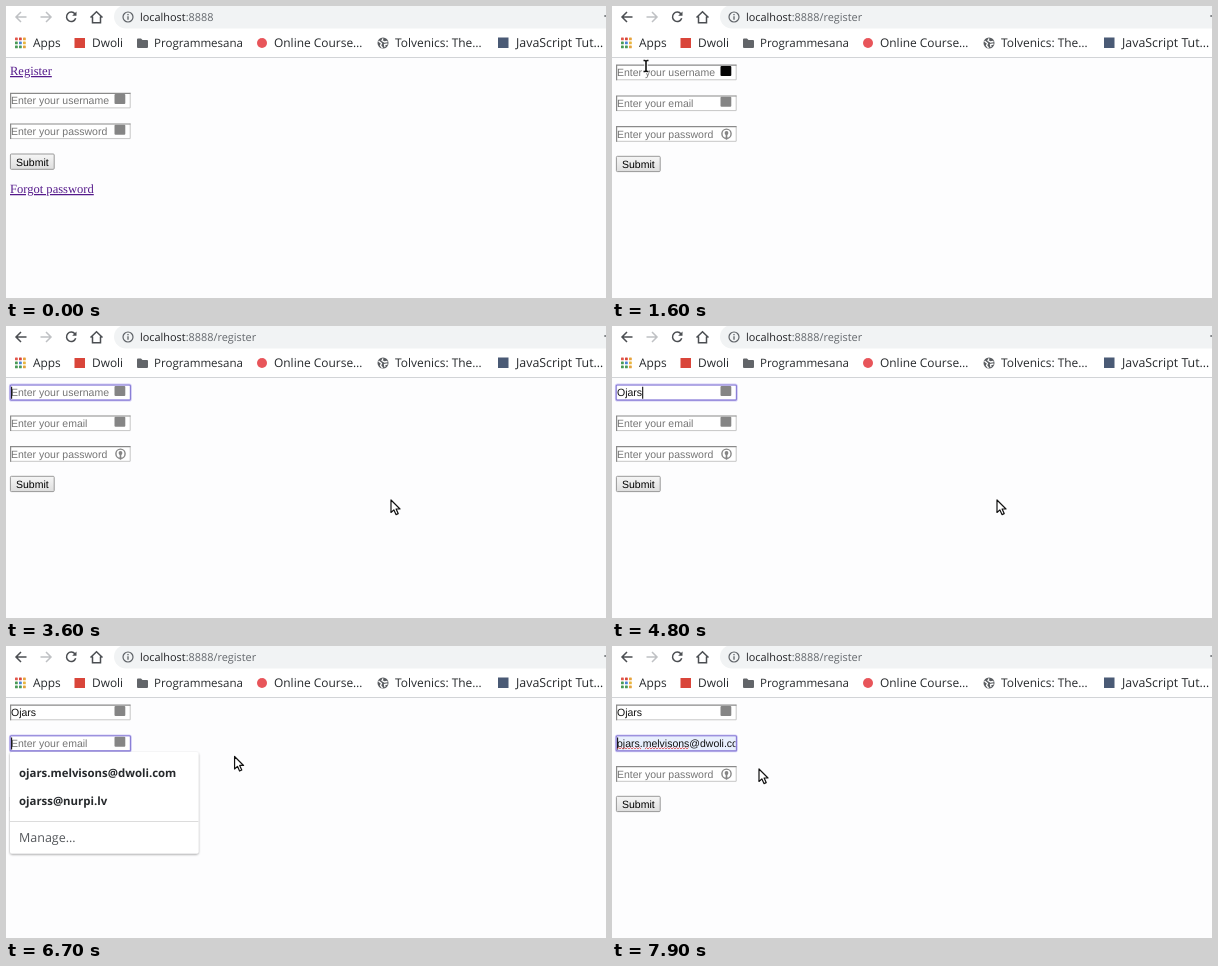
Recreate the animation shown at these times as an HTML page. Size 600x292 px, loop 8 s.

```html
<!DOCTYPE html>
<html lang="en">
<head>
<meta charset="utf-8">
<title>Registration form</title>
<style>
  html, body { margin: 0; width: 100%; height: 100%; overflow: hidden; background: #fdfdfe; }
  svg { display: block; }
  text { white-space: pre; text-rendering: geometricPrecision; }
  .ui { font-family: "Open Sans", "Noto Sans", sans-serif; fill: #26292c; }
  .field { font: 10.5px "Liberation Sans", Arial, sans-serif; }
  .link { font: 12.55px "Liberation Serif", "Times New Roman", serif; fill: #551a8b; text-decoration: underline; }
</style>
</head>
<body>
<svg id="stage" width="600" height="292" viewBox="0 0 600 292">
  <defs>
    <linearGradient id="face" x1="0" y1="0" x2="0" y2="1">
      <stop offset="0" stop-color="#f6f6f6"/><stop offset="1" stop-color="#dedede"/>
    </linearGradient>
    <filter id="shadow" x="-10%" y="-10%" width="120%" height="125%">
      <feDropShadow dx="0" dy="1" stdDeviation="1.3" flood-opacity=".4"/>
    </filter>
    <clipPath id="inner"><rect x="4" y="50" width="119.5" height="100"/></clipPath>
  </defs>
  <rect width="600" height="292" fill="#fdfdfe"/>
  <rect width="600" height="51" fill="#fff"/>
  <rect x="108" y="-1" width="520" height="23.5" rx="11.7" fill="#f1f3f4"/>
  <path d="M0 51.5H600" stroke="#d2d4d7"/>

  <g fill="none" stroke="#4b4e52" stroke-width="1.5">
    <path id="back" d="M20.5 11H10.5M15 6L10 11L15 16"/>
    <path d="M34.5 11H44.5M40 6L45 11L40 16" stroke="#bfc1c4"/>
    <path d="M69 8A4.7 4.7 0 1 0 69.7 12.3"/>
    <path d="M70.5 5.5V9.8H66.2Z" fill="#4b4e52" stroke="none"/>
    <path d="M84.5 11.5L90.5 5.8L96.5 11.5M86.5 10.5V16.7H94.5V10.5"/>
    <circle cx="122" cy="11" r="5" stroke="#5f6368" stroke-width="1.2"/>
    <path d="M122 10.3V13.8M122 8V9.3" stroke="#5f6368" stroke-width="1.3"/>
    <path d="M598.3 10H600" stroke="#5f6368"/>
  </g>
  <text class="ui" x="134" y="15" font-size="10.9"><tspan fill="#202124">localhost</tspan><tspan fill="#63676c">:8888</tspan><tspan id="route" fill="#63676c">/register</tspan></text>

  <g id="marks"></g>
  <rect x="68.5" y="32" width="10.5" height="10" fill="#d9453a"/>
  <path d="M131 33.5Q131 32.5 132 32.5H135L136.5 34H141Q142 34 142 35V41Q142 42 141 42H132Q131 42 131 41Z" fill="#626569"/>
  <circle cx="256" cy="37" r="5" fill="#e8555a"/>
  <circle cx="377" cy="37" r="5.5" fill="#5a5d61"/>
  <path d="M372.5 35L375.5 37.5L374.5 39.5L376.5 42M377 32.5L376 34.5L378.5 36L381.5 35.5M379 41L378.5 38.5L381.5 38" fill="none" stroke="#fff" stroke-width="1.3"/>
  <rect x="492" y="31.5" width="10.5" height="10.5" fill="#4a5a75"/>

  <g id="page"></g>
  <g id="menu">
    <rect x="4" y="106" width="188.5" height="101.5" rx="2" fill="#fff" filter="url(#shadow)"/>
    <rect id="option" x="4" y="112.5" width="188.5" height="28" fill="#c5c5c5"/>
    <g class="ui" font-size="11.4" font-weight="700">
      <text x="13" y="131">ojars.melvisons@dwoli.com</text>
      <text x="13" y="159">ojarss@nurpi.lv</text>
    </g>
    <path d="M4 175.5H192.5" stroke="#dcdcdc"/>
    <text class="ui" x="13" y="196" font-size="12.5" style="fill:#55585c">Manage…</text>
  </g>
  <g id="pointer" stroke-linejoin="round"></g>
</svg>
<script>
const $ = id => document.getElementById(id);
const LOOP = 8000, STEP = 100;
const NAME = "Ojars", EMAIL = "ojars.melvisons@dwoli.com";
const DOTS = ["#e2574c", "#d9453a", "#e8a33d", "#4a9a57", "#4a83d4", "#e8b53d", "#4a9a57", "#4a9a57", "#e2a33d"];

$("marks").innerHTML = DOTS.map((c, i) =>
  `<rect x="${9 + i % 3 * 4}" y="${31.5 + Math.floor(i / 3) * 4}" width="2.8" height="2.8" rx=".6" fill="${c}"/>`).join("") +
  [["Apps", 27, 11.9], ["Dwoli", 86, 11.9], ["Programmesana", 148, 11.55], ["Online Course…", 268, 11.95],
   ["Tolvenics: The…", 389, 11.95], ["JavaScript Tut…", 510, 12.4]].map(([s, x, size]) =>
  `<text class="ui" x="${x}" y="41" font-size="${size}">${s}</text>`).join("");

// time, x, y of the pointer's hot spot
const PATH = [
  [100, 517, 175], [900, 34, 60], [1600, 34, 60], [2100, 58, 69], [2300, 58, 69],
  [3100, 385, 174], [5400, 385, 174], [6300, 84.5, 97.5], [6500, 84.5, 97.5],
  [6800, 279, 115], [7100, 151, 123], [7500, 151, 123], [7900, 147, 123]
];

const BEAM = "M-2.5-5.5H-1L0-4.5L1-5.5H2.5M0-4.5V4.5M-2.5 5.5H-1L0 4.5L1 5.5H2.5";
const SHAPES = {
  arrow: `<path d="M0 0V12.5L2.9 9.9L5 14.6L7.2 13.6L5.1 9H9Z" fill="#fff" stroke="#111" stroke-width="1.2"/>`,
  hand: `<path d="M-1 1Q-1-1 .5-1Q2-1 2 1V4Q3.5 3 4.5 4.5Q6 3.7 6.8 5.2Q8.5 4.7 8.5 6.5V9L7.5 12.5H0L-3.5 7.5Q-3.5 5.7-1 7.5Z" fill="#fff" stroke="#111" stroke-width="1.2"/>
    <path d="M2 4V6.5M4.5 4.5V6.5M6.8 5.2V7" stroke="#111"/>`,
  beam: `<path d="${BEAM}" fill="none" stroke="#fff" stroke-width="3.4"/><path d="${BEAM}" fill="none" stroke="#111" stroke-width="1.6"/>`
};

function position(t) {
  let i = 0;
  while (i < PATH.length - 2 && t >= PATH[i + 1][0]) i++;
  const [t0, x0, y0] = PATH[i], [t1, x1, y1] = PATH[i + 1];
  const p = Math.max(0, Math.min(1, (t - t0) / (t1 - t0))), e = p * p * (3 - 2 * p);
  return [x0 + (x1 - x0) * e, y0 + (y1 - y0) * e];
}

const inside = ([px, py], x, y, w, h) => px >= x && px <= x + w && py >= y && py <= y + h;
const show = (id, on) => $(id).setAttribute("display", on ? "inline" : "none");

function squiggle(x0, x1, y) {
  let d = `M${x0} ${y}`;
  for (let x = x0 + 1.5, k = 1; x <= x1; x += 1.5, k++) d += `L${x} ${y - k % 2 * 1.5}`;
  return `<path d="${d}" fill="none" stroke="#e04848" stroke-width=".8"/>`;
}

function field(y, hint, o = {}) {
  let s = `<rect x="4" y="${y + .5}" width="120.5" height="15.5" fill="${o.filled ? "#e8effd" : "#fff"}"/>`;
  if (o.focus) s += `<rect x="4" y="${y + .5}" width="120.7" height="15.7" rx="1.5" fill="none" stroke="#d3cdf6" stroke-width="2.2"/>
    <rect x="4.2" y="${y + .8}" width="120.3" height="15.1" rx="1" fill="none" stroke="#8a7fd6" stroke-width="1.1"/>`;
  else s += `<path d="M4 ${y + 15.6}H124.2V${y + .5}" fill="none" stroke="#c6c6c6"/>
    <path d="M4.6 ${y + 16}V${y + 1}H124.5" fill="none" stroke="#8a8a8a" stroke-width="1.2"/>`;
  s += `<text class="field" x="5" y="${y + 12}" clip-path="url(#inner)" fill="${o.value ? "#111" : "#757575"}">${o.value || hint}</text>`;
  if (o.caret != null) s += `<path d="M${o.caret} ${y + 2.5}V${y + 14.5}" stroke="#111" stroke-width="1.1"/>`;
  if (o.icon === "key") s += `<circle cx="114.5" cy="${y + 8}" r="4.6" fill="none" stroke="#858585" stroke-width="1.4"/>
    <circle cx="114.5" cy="${y + 7.3}" r="1.9" fill="#858585"/><path d="M114.5 ${y + 8}V${y + 14}" stroke="#858585" stroke-width="1.6"/>`;
  else if (o.icon !== "none") s += `<rect x="108.5" y="${y + 1.8}" width="10.8" height="10" rx="1" fill="${o.hover ? "#050505" : "#858585"}"/>`;
  return s;
}

const button = y => `<rect x="4.4" y="${y}" width="43.8" height="15.3" rx="1" fill="url(#face)" stroke="#999"/>
  <text class="field" x="10" y="${y + 11.5}" fill="#000">Submit</text>`;
const link = (s, y) => `<text class="link" x="4" y="${y}">${s}</text>`;

const login = over => link("Register", 69) +
  field(86.3, "Enter your username", { hover: over(86) }) +
  field(117, "Enter your password", { hover: over(117) }) +
  button(148) + link("Forgot password", 187);

function register(t, over, preview) {
  const typed = t < 4500 ? "" : t < 4800 ? NAME.slice(0, (t - 4400) / 100) : NAME;
  const widths = [0, .778, 1, 1.556, 1.889, 2.389];
  const onName = t >= 2300 && t < 6500, onEmail = t >= 6500;
  const blink = t < 4500 ? (t - 2600 + 1000) % 1000 < 500 : t < 5500 || t >= 6000;
  return field(58.2, "Enter your username", {
    value: typed, focus: onName, hover: over(58),
    caret: onName && blink ? 5.6 + widths[typed.length] * 10.5 : null
  }) + field(89, "Enter your email", {
    value: preview ? EMAIL : "", filled: preview, focus: onEmail, hover: over(89),
    icon: preview ? "none" : "", caret: onEmail ? 5.6 : null
  }) + (t >= 7600 ? squiggle(5, 30, 103) + squiggle(33, 77, 103) : "") +
    field(119.7, "Enter your password", { icon: "key" }) + button(150.3);
}

function draw(ms) {
  const t = Math.floor(ms % LOOP / STEP) * STEP;
  const pos = position(t), second = t >= 1300, menu = t >= 6600 && t < 7600;
  const over = y => inside(pos, 4, y, 120, 17);
  const chosen = menu && inside(pos, 4, 112, 188, 28);
  $("page").innerHTML = second ? register(t, over, chosen || t >= 7600) : login(over);
  $("back").setAttribute("stroke", second ? "#4b4e52" : "#bfc1c4");
  show("route", second);
  show("menu", menu);
  show("option", chosen);
  const rows = second ? [58, 89, 120] : [86, 117];
  const kind = !second && inside(pos, 4, 57, 42, 15) ? "hand" : !menu && rows.some(over) ? "beam" : "arrow";
  $("pointer").innerHTML = SHAPES[kind];
  $("pointer").setAttribute("transform", `translate(${pos})`);
  show("pointer", t >= 100);
}

let start;
function tick(now) {
  start ??= now;
  draw(now - start);
  requestAnimationFrame(tick);
}
draw(0);
requestAnimationFrame(tick);
</script>
</body>
</html>
```
